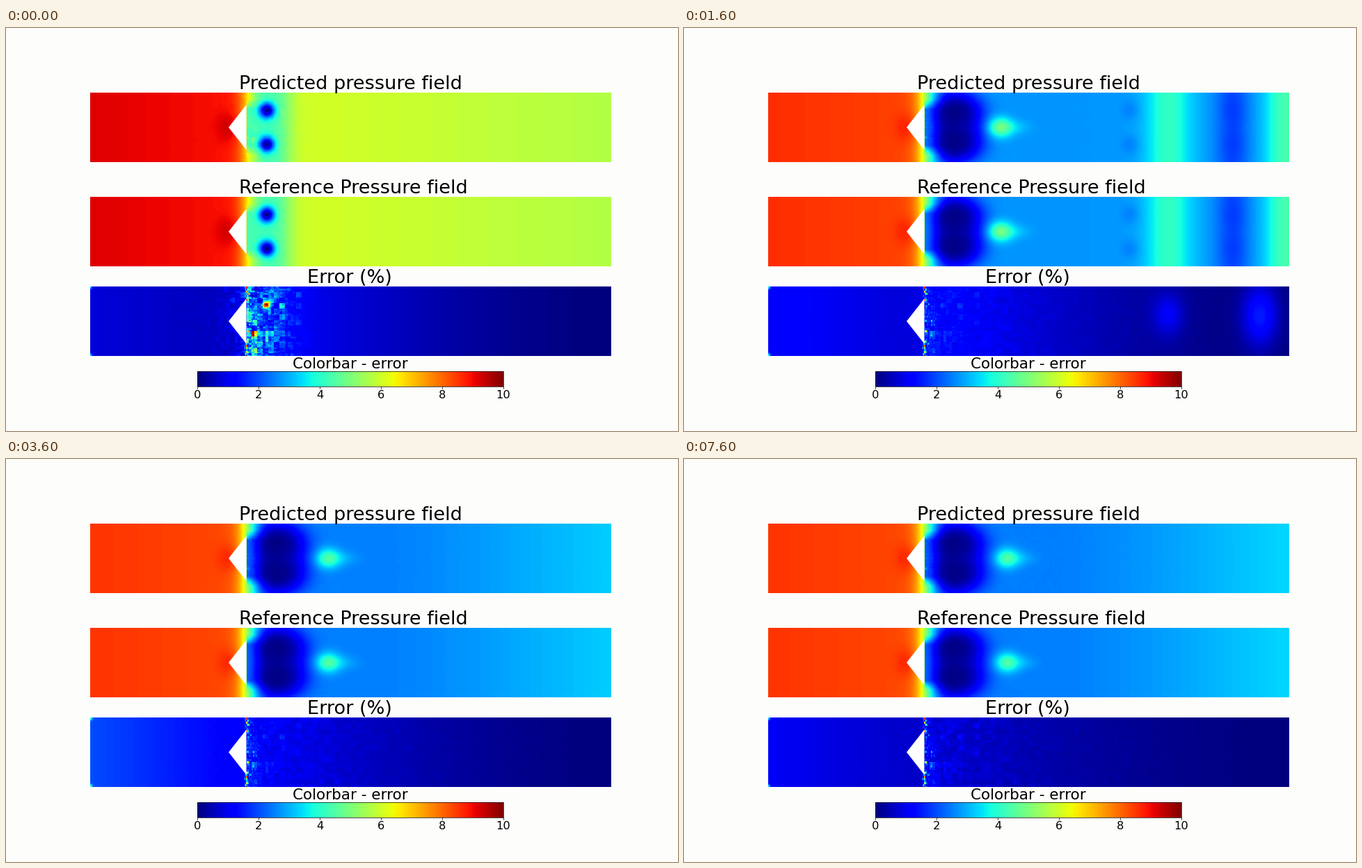
Animation, 966 px wide and 580 px high, one loop 8000 ms. Source, as a matplotlib script:

```python
import numpy as np
import matplotlib.pyplot as plt
from matplotlib.animation import FuncAnimation

W, H, DPI = 966, 580, 100
LEFT, WIDTH, HEIGHT = 121, 749, 100
TOPS = (93, 243, 372)
INK = "black"

# Pixel coordinates inside a channel; y is measured from its axis.
X = np.arange(WIDTH)[None, :] + LEFT + 0.5
Y = np.arange(HEIGHT)[:, None] - HEIGHT / 2 + 0.5
BACK = 345.5  # rear face of the triangle
rng = np.random.default_rng(7)


def sigmoid(v):
    return 1 / (1 + np.exp(-np.clip(v, -60, 60)))


def blob(x, y, amp, sx, sy):
    return amp * np.exp(-((X - x) / sx) ** 2 - ((Y - y) / sy) ** 2)


def pair(x, y, amp, sx, sy):
    return blob(x, y, amp, sx, sy) + blob(x, -y, amp, sx, sy)


def band(x, amp, sx):
    return amp * np.exp(-((X - x) / sx) ** 2)


def cells(w, h):
    """Random blocks of w by h pixels with zero mean."""
    grid = rng.exponential(1, (HEIGHT // h + 1, WIDTH // w + 1))
    return np.repeat(np.repeat(grid, h, 0), w, 1)[:HEIGHT, :WIDTH] - 1


GRAIN = 0.5 * cells(8, 8) + 0.35 * cells(4, 8) + 0.25 * cells(8, 3) + 0.2 * cells(3, 2)
FINE = cells(2, 3) + 1
NEAR = np.where(X > BACK, np.exp(-(X - BACK) / 8), 0)
STREAK = np.exp(-((X - BACK) / 1.8) ** 2) * (np.abs(Y) > 27)


def waves(k):
    """Places of the starting front, its lead vortices and the light band."""
    front = 405 + 170 * k - 8 * k ** 2
    lead = front - 30 - 8 * k
    light = lead - 30 - 7 * k ** 2
    swell = np.exp(-((k - 3) / 1.9) ** 2)
    return front, lead, light, swell


def bubble(k):
    """Two low-pressure lobes merged behind the triangle."""
    dx = X - 386
    reach = np.where(dx > 0, 47 - 19 * np.exp(1 - k), 30)
    gap = 1
    for side in (-1, 1):
        r = np.hypot(dx / reach, (Y - 21 * side) / 33)
        gap = gap * (1 - np.exp(-r ** 3))
    return 0.97 * min(k, 1) * (1 - gap)


def pressure(k):
    front, lead, light, swell = waves(k)
    inlet = 8.55 + 0.6 * np.exp(-0.75 * k) - 0.2 * np.clip((X - LEFT) / 180, 0, 1)
    inlet = inlet + blob(322, 0, 0.5, 17, 20)

    # Wake behind the front, still fluid ahead of it.
    rise = 0.9 * (1 - np.exp(-(k / 5) ** 2))
    wake = 2.5 + 1.75 * np.exp(-0.7 * k) + rise * (np.clip(X - 540, 0, None) / 330) ** 1.3
    wake = wake + band(light, 1.3 * swell, 20 + 4 * k)
    wake = wake + band(lead, -0.9 * min(k, 1), 14 + 4 * k)
    ahead = 4.4 + 1.7 * np.exp(-k) - 0.45 * np.exp(-k) * (X - 400) / 470
    mix = sigmoid((X - front) / 8)
    down = (wake * (1 - mix) + ahead * mix) * (1 - bubble(k))

    core = 11 + 4 * k
    down = down + pair(lead, 24.5, -4.1 * np.exp(-2 * k) - 0.15, core, core)
    down = down + pair(light - 18 * k, 25, -0.3 * swell * min(k, 1), 13, 14)
    tail = 464 - 26 * np.exp(-0.5 * (k - 1))
    amp = min(k, 1) * (1.9 + 0.7 * np.exp(-0.5 * (k - 1)))
    down = down + blob(tail, 0, amp, 17, 14) + blob(tail + 22, 0, 0.2 * amp, 20, 10)

    # Smooth change above and below the triangle, hard edge at its rear face.
    w = sigmoid((X - 347) / 8)
    side = np.clip((np.abs(Y) - 26) / 14, 0, 1)
    w = np.where(X > BACK, 1 - (1 - w) * side, w)
    return inlet * (1 - w) + down * w


def plume(k):
    """Strength of the blocky error along the channel."""
    front = waves(k)[0]
    level = 0.3 + 1.5 * np.exp(-(k / 1.6) ** 3)
    wake = np.exp(-(X - BACK) / (50 + 60 * min(k, 1))) * sigmoid((front + 20 - X) / 8)
    return level * np.where(X > BACK, wake, 0.3 * np.exp((X - BACK) / 25))


def error(k, strength):
    front, lead, light, swell = waves(k)
    inlet = 0.6 + 1.5 * np.exp(-((k - 8.5) / 6) ** 2)
    inlet = inlet * (1 - 0.45 * (X - LEFT) / (BACK - LEFT))
    t = np.clip((X - 400) / 470, 0, 1)
    outlet = (0.5 + 0.6 * np.exp(-(k / 10) ** 2)) * (1 - t) ** 1.6
    w = sigmoid((X - BACK) / 12)
    err = inlet * (1 - w) + outlet * w + strength * (1 + 1.3 * GRAIN)
    err = err + NEAR * FINE + 2.6 * STREAK * FINE + pair(LEFT, 49, 2.6, 3, 3)
    err = err + blob(light, -10, 0.9 * swell, 22, 30)
    err = err + blob(front - 15, -8, 1.5 * swell, 26, 45)
    return err + blob(lead, -24, 6.5 * np.exp(-3 * k), 5, 5)


def fields(k):
    ref = pressure(k)
    strength = plume(k)
    pred = ref + 0.12 * strength * GRAIN + 0.12 * NEAR * (FINE - 1)
    return [np.clip(f, 0, 10) for f in (pred, ref, error(k, strength))]


STEPS = [fields(k) for k in range(16)]

fig = plt.figure(figsize=(W / DPI, H / DPI), dpi=DPI, facecolor="#fdfdfc")
ax = fig.add_axes([0, 0, 1, 1])
ax.axis("off")


def show(data, x0, y0, x1, y1):
    return ax.imshow(data, cmap="jet", vmin=0, vmax=10, extent=(x0, x1, y1, y0),
                     interpolation="nearest", aspect="auto")


def label(x, y, s, px, ha="left"):
    ax.text(x, y, s, fontsize=px * 72 / DPI, family="DejaVu Sans",
            color=INK, ha=ha, va="baseline")


panels = []
for top, field in zip(TOPS, STEPS[0]):
    panels.append(show(field, LEFT, top, LEFT + WIDTH, top + HEIGHT))
    mid = top + HEIGHT / 2
    ax.fill([320, BACK, BACK], [mid, mid - 32.5, mid + 32.5], color="white", lw=0)

label(334.6, 88, "Predicted pressure field", 27.1)
label(334.6, 238, "Reference Pressure field", 27.1)
label(433, 367, "Error (%)", 27.1)
label(411.8, 489.5, "Colorbar - error", 21.5)

show(np.linspace(0, 10, 256)[None, :], 275, 494, 715, 516)
ax.plot([275, 715, 715, 275, 275], [494, 494, 516, 516, 494], color=INK, lw=0.5)
for v in range(0, 11, 2):
    x = 275 + 44 * v
    ax.plot([x, x], [516, 519], color=INK, lw=0.5)
    label(x, 533, str(v), 16.3, "center")

ax.set_xlim(0, W)
ax.set_ylim(H, 0)


def update(i):
    # Steps alternate between 600 ms and 400 ms.
    k = 2 * (i // 5) + (i % 5 >= 3)
    for img, field in zip(panels, STEPS[k]):
        img.set_data(field)
    return panels


anim = FuncAnimation(fig, update, frames=40, interval=200, repeat=True,
                     repeat_delay=0, blit=False)
plt.show()
```
